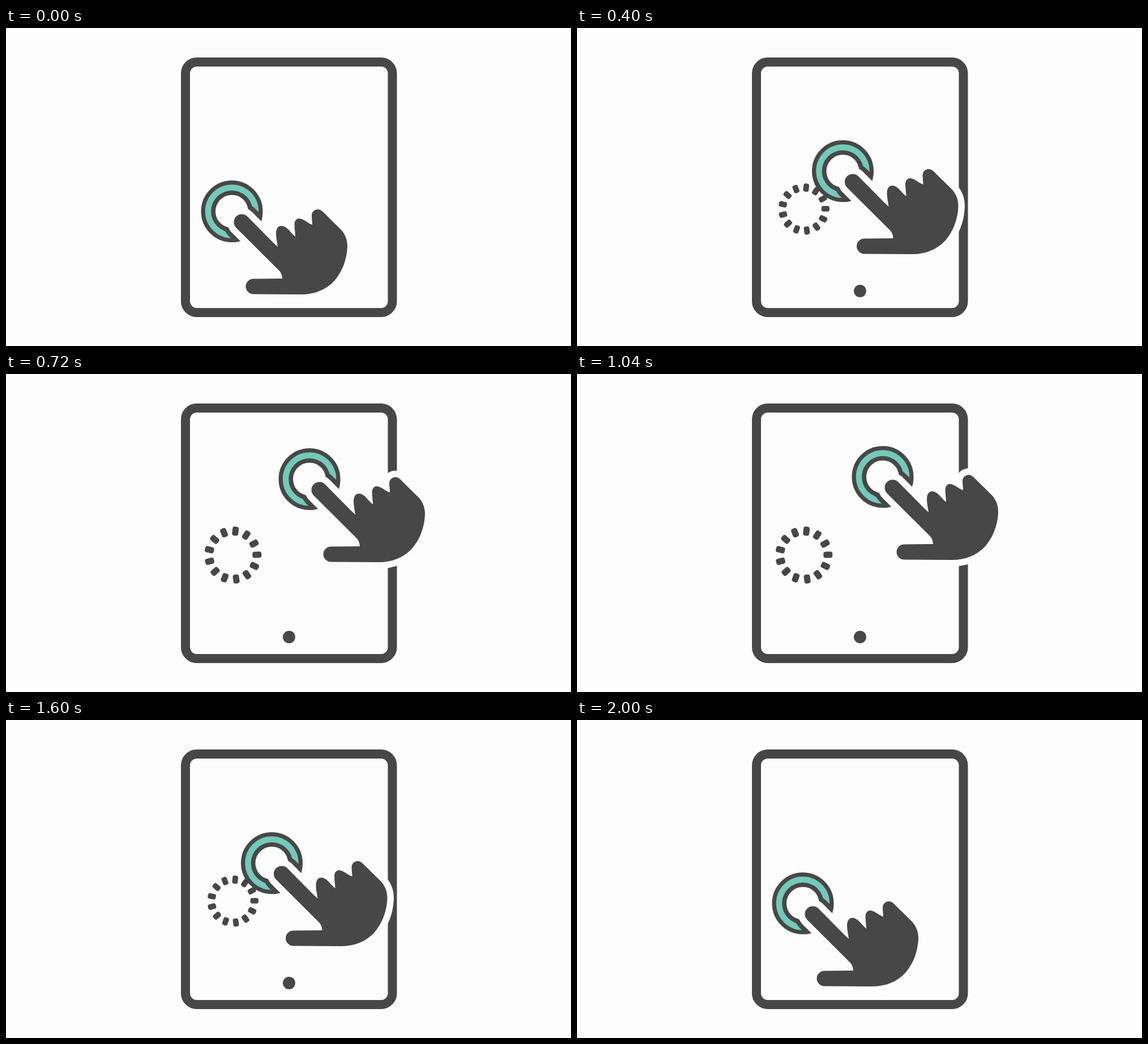
These frames come from a looping animation (998 px wide and 561 px high, 2.04 s). An HTML page:

```html
<!DOCTYPE html>
<html lang="en">
<head>
<meta charset="utf-8">
<title>Drag gesture</title>
<style>
  html, body { margin: 0; width: 100%; height: 100%; overflow: hidden; background: #fefdfe; }
  svg { display: block; width: 998px; height: 561px; }
  .ink { fill: #474747; }
  .line { fill: none; stroke: #474747; }
</style>
</head>
<body>
<svg viewBox="0 0 998 561" xmlns="http://www.w3.org/2000/svg">
  <defs>
    <clipPath id="band">
      <path clip-rule="evenodd" d="M344.5 323.5a54.5 54.5 0 1 0 109 0a54.5 54.5 0 1 0 -109 0z
        M370 323.5a29 29 0 1 0 58 0a29 29 0 1 0 -58 0z"/>
    </clipPath>
    <path id="hand" d="M426.4 332.6 L464 370.5 Q472 379 480 386
      C479 378 477 371 477 363 C477 353 481 349 487 349 C497 350 502 361 511 368
      C511 362 509.5 354 509.5 347 C509.5 340 513 336 518 336 C527 337 532 344 541 347
      C541 342 540 337 540 331 C540 324 545 320 551 320 Q556 320 560 324.5
      L591 355 C599 363 603 373 603 386 C602 409 594 430 580 446
      C565 462 545 470 521 470 L437 469.5 A13.5 13.5 0 0 1 437 442.5 L488 442
      C487.5 435 485.5 430.5 481 426.5 L406.6 352.4 A14 14 0 0 1 426.4 332.6 Z"/>
  </defs>
  <rect class="line" x="317" y="60" width="365.5" height="442" rx="20" stroke-width="16"/>
  <circle class="ink" cx="500" cy="464" r="11"/>
  <g id="spot" class="ink"></g>
  <g id="trail" class="ink"></g>
  <g id="pointer">
    <circle cx="399" cy="323.5" r="41.75" fill="#fefdfe" stroke="#474747" stroke-width="25.5"/>
    <circle cx="399" cy="323.5" r="42" fill="none" stroke="#74c9b8" stroke-width="10.4"/>
    <g clip-path="url(#band)">
      <path class="line" d="M416.5 342.5l50 50" stroke-width="67" stroke-linecap="round"/>
    </g>
    <use href="#hand" fill="#fefdfe" stroke="#fefdfe" stroke-width="23" stroke-linejoin="round"/>
    <use href="#hand" class="ink"/>
  </g>
</svg>
<script>
  const LOOP = 2040, TURN = 1000, STEP = 40;
  const byId = id => document.getElementById(id);
  const spot = byId('spot'), trail = byId('trail'), pointer = byId('pointer');

  function addDash(parent, w, h, transform) {
    const r = document.createElementNS('http://www.w3.org/2000/svg', 'rect');
    const attrs = { x: -w / 2, y: -h / 2, width: w, height: h, rx: 4, transform };
    for (const k in attrs) r.setAttribute(k, attrs[k]);
    parent.appendChild(r);
    return r;
  }

  for (let i = 0; i < 13; i++)
    addDash(spot, 11, 16, `rotate(${6 + i * 360 / 13}) translate(0 -42.5)`);
  const dashes = [0, 1, 2, 3].map(() => addDash(trail, 10, 20, ''));

  function ease(t, start, length) {
    const p = Math.min(1, Math.max(0, (t - start) / length));
    return p * p * (3 - 2 * p);
  }

  function draw(time) {
    // the second half plays the first one backwards
    const t = time > TURN ? Math.max(0, 2 * TURN - time) : time;
    const k = ease(t, 0, 800);
    pointer.setAttribute('transform', `translate(${141 * k} ${-142 * k})`);
    spot.setAttribute('transform', `translate(400.8 319.5) scale(${ease(t, 80, 400)})`);
    dashes.forEach((d, i) => {
      const s = ease(t, 332 + 115 * i, 160);
      d.setAttribute('transform',
        `translate(${447 + 14.1 * i} ${272 - 14 * i}) rotate(-45) scale(${s})`);
    });
  }

  const begin = performance.now();
  function tick() {
    const now = (performance.now() - begin) % LOOP;
    draw(Math.floor(now / STEP) * STEP);
    requestAnimationFrame(tick);
  }
  draw(0);
  requestAnimationFrame(tick);
</script>
</body>
</html>
```
